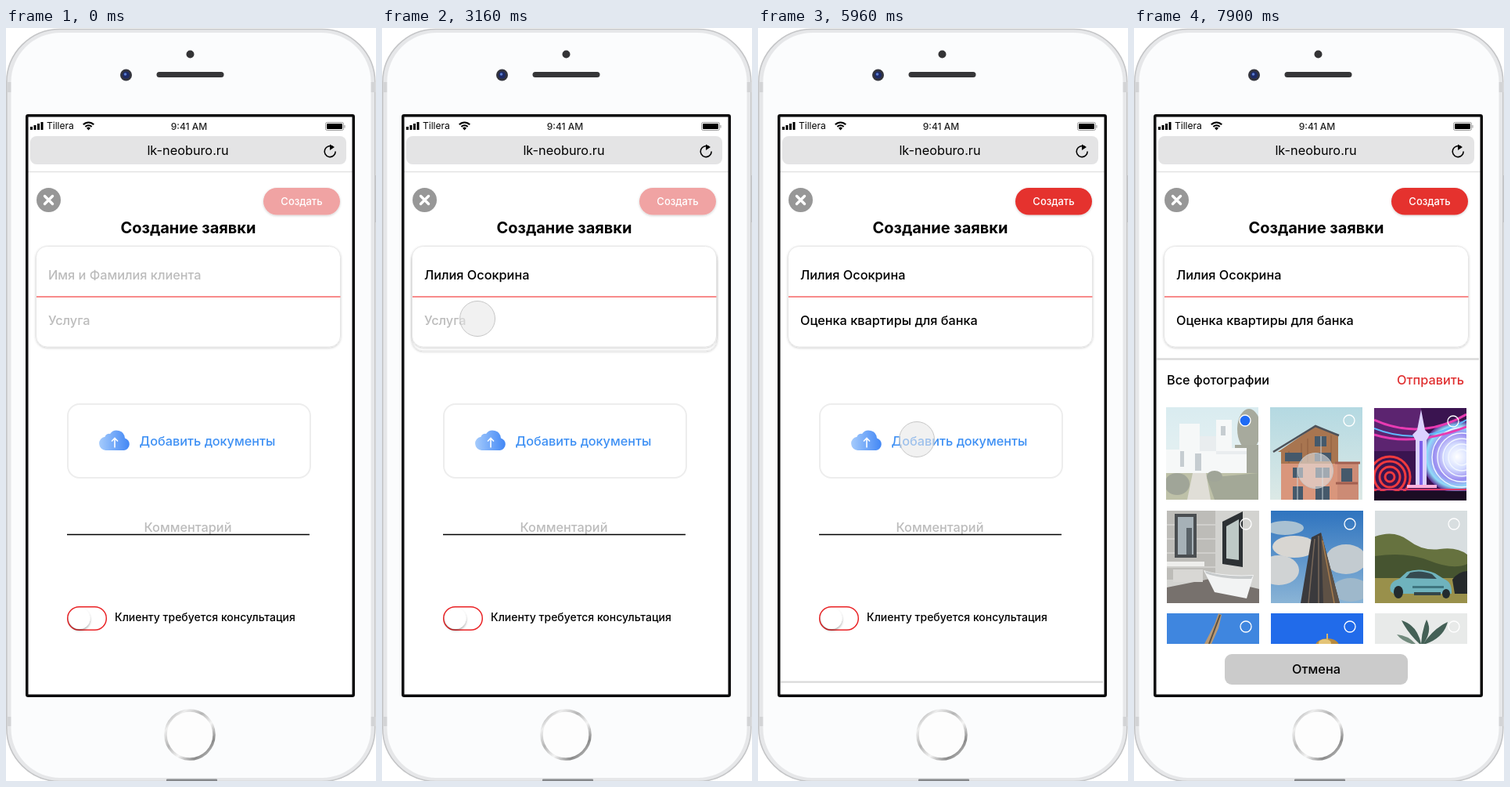
Write an HTML page that moves like this. It is 473x961 px and loops after 8 s.

```html
<!DOCTYPE html>
<html lang="ru">
<head>
<meta charset="utf-8">
<title>Создание заявки</title>
<style>
  html, body { margin: 0; width: 100%; height: 100%; overflow: hidden; background: #fff; }
  svg { display: block; }
  #stage { width: 100vw; height: 100vh; }
  text { font-family: Inter, "Open Sans", "Noto Sans", sans-serif; font-weight: 500; font-size: 16.3px; }
  .mid { text-anchor: middle; }
  .hint { fill: #bcbcbc; }
  .plain { font-weight: 400; }
  .tiny { font-size: 12px; }
  .small { font-size: 13.5px; }
</style>
</head>
<body>
<svg id="stage" viewBox="0 0 473 961" xmlns="http://www.w3.org/2000/svg">
  <defs>
    <clipPath id="screen"><rect x="28" y="113" width="415" height="738"/></clipPath>
    <filter id="soft" x="-10%" y="-20%" width="120%" height="150%">
      <feDropShadow dx="0" dy="1" stdDeviation="1.4" flood-opacity=".2"/>
    </filter>
    <filter id="knob" x="-30%" y="-30%" width="160%" height="170%">
      <feDropShadow dx="0" dy="2" stdDeviation="1.8" flood-opacity=".35"/>
    </filter>
    <linearGradient id="cloud"><stop stop-color="#a5cbfc"/><stop offset="1" stop-color="#4287f5"/></linearGradient>
    <linearGradient id="metal" x2="1" y2="1">
      <stop stop-color="#8d8d8d"/><stop offset=".2" stop-color="#eee"/><stop offset=".4" stop-color="#b5b5b5"/>
      <stop offset=".6" stop-color="#f4f4f4"/><stop offset=".8" stop-color="#8a8a8a"/><stop offset="1" stop-color="#ddd"/>
    </linearGradient>
    <linearGradient id="sky" x2="0" y2="1"><stop stop-color="#b4d9e2"/><stop offset="1" stop-color="#dce9e6"/></linearGradient>
    <linearGradient id="blue" x2="0" y2="1"><stop stop-color="#2f74bf"/><stop offset="1" stop-color="#8ab4d6"/></linearGradient>
    <radialGradient id="wheel">
      <stop stop-color="#fff"/><stop offset=".35" stop-color="#d5deff"/><stop offset=".65" stop-color="#9a8cf0"/>
      <stop offset=".85" stop-color="#8fdcf8"/><stop offset="1" stop-color="#5b2a90"/>
    </radialGradient>
  </defs>

  <!-- phone body -->
  <rect x="-1" y="188" width="4" height="50" fill="#c9cacc"/>
  <rect x="470" y="188" width="4" height="60" fill="#c9cacc"/>
  <rect x=".8" y="1.5" width="471" height="960" rx="68" fill="#e6e7e9" stroke="#c4c5c7" stroke-width="1.6"/>
  <path d="M1 69h6v13H1zM466 69h6v13h-6zM1 879h6v12H1zM466 879h6v12h-6z" fill="#d3d4d6"/>
  <rect x="6.5" y="6" width="460" height="951" rx="63" fill="#fbfcfd"/>
  <rect x="205" y="958.5" width="65" height="3" rx="1" fill="#85878a"/>
  <circle cx="235.5" cy="33.5" r="5" fill="#343436"/>
  <rect x="192.5" y="56" width="86" height="7" rx="3.5" fill="#363638"/>
  <circle cx="153.5" cy="60" r="7.5" fill="#33343d"/>
  <circle cx="153.5" cy="60" r="4.5" fill="#1d2a66"/>
  <circle cx="152.5" cy="59" r="1.8" fill="#5a7cd0"/>
  <circle cx="235" cy="902" r="31" fill="#fdfdfd" stroke="url(#metal)" stroke-width="3.5"/>

  <g clip-path="url(#screen)">
    <rect x="28" y="113" width="415" height="738" fill="#fff"/>

    <!-- browser bar -->
    <path d="M31 126h3v4h-3zM35.5 124h3v6h-3zM40 122h3v8h-3zM44.5 120h3v10h-3z"/>
    <text class="plain tiny" x="52" y="129">Tillera</text>
    <path d="M98.800 123.200a9.400 9.400 0 0 1 13.400 0M101.400 126a5.800 5.800 0 0 1 8.200 0" fill="none" stroke="#000" stroke-width="2"/>
    <path d="M103 127.800a3.600 3.600 0 0 1 5 0l-2.500 2.600z"/>
    <text class="mid tiny" x="234" y="129.5" fill="#222">9:41 AM</text>
    <rect x="408.5" y="120.5" width="23" height="10" rx="2" fill="none" stroke="#999"/>
    <rect x="410" y="122" width="20" height="7" rx="1"/>
    <path d="M433 124v3.5" stroke="#999"/>
    <rect x="31" y="138" width="404" height="36" rx="8" fill="#e4e4e5"/>
    <text class="mid plain" x="232.5" y="162">lk-neoburo.ru</text>
    <path d="M418 151.700a7 7 0 1 0 3.200 5.800" fill="none" stroke="#000" stroke-width="1.600"/>
    <path d="M414 148.500l6 3.500-6 4z"/>
    <path d="M28 183.500h415" stroke="#e3e3e3" stroke-width="1.5"/>

    <!-- form -->
    <circle cx="54.5" cy="219.5" r="15.5" fill="#979797"/>
    <path d="M49.500 214.500l10 10m0-10l-10 10" stroke="#fff" stroke-width="3.4" stroke-linecap="round"/>
    <rect id="create" x="329" y="204" width="98" height="34.5" rx="17.25" filter="url(#soft)"/>
    <text class="mid" x="378" y="225.5" style="font-size:13px" fill="#fff">Создать</text>
    <text class="mid" x="233" y="261.5" style="font-size:20px;font-weight:700">Создание заявки</text>

    <g id="drop">
      <rect x="38.5" y="326" width="389.5" height="129.5" rx="14" fill="#fff" stroke="#ececec" filter="url(#soft)"/>
      <text class="small" x="52" y="435">Оценка квартиры для банка</text>
    </g>
    <rect x="38.5" y="278.5" width="389" height="128.5" rx="14" fill="#fff" stroke="#e6e6e6" filter="url(#soft)"/>
    <path d="M39 343h388.500" stroke="#f88b8b" stroke-width="1.8"/>
    <text id="client" x="54" y="321"></text>
    <text id="service" x="54" y="379"></text>

    <rect x="79" y="480" width="310" height="94" rx="15" fill="#fff" stroke="#ededed" stroke-width="2"/>
    <path d="M127.500 539a8.700 8.700 0 0 1-1-17.300 5.500 5.500 0 0 1 6.500-3.800 10.500 10.500 0 0 1 19 5.500 8 8 0 0 1-1 15.600z" fill="url(#cloud)"/>
    <path d="M139 535.500v-12m-4 4l4-4 4 4" fill="none" stroke="#fff" stroke-width="1.6"/>
    <text class="mid" x="257.5" y="533" fill="#3e90f4">Добавить документы</text>

    <text class="mid hint" x="232.5" y="643">Комментарий</text>
    <path d="M78 646.500h310" stroke="#000" stroke-width="1.5"/>
    <rect x="78.7" y="738.7" width="49.6" height="29.6" rx="14.8" fill="#fff" stroke="#ea2225" stroke-width="1.5"/>
    <circle cx="94" cy="753.5" r="13.5" fill="#fff" filter="url(#knob)"/>
    <text style="font-size:14px" x="139" y="757">Клиенту требуется консультация</text>
    <path id="edge" d="M29 848.500h321" stroke="#d4d4d4" stroke-width="2"/>

    <!-- photo picker, drawn at its resting place -->
    <g id="sheet">
      <rect x="29" y="422" width="412" height="560" fill="#fff"/>
      <path d="M29 422.500h412" stroke="#dadada" stroke-width="2.4"/>
      <text x="42" y="454.500">Все фотографии</text>
      <text id="send" class="mid" x="379" y="454.500" fill="#e02f30">Отправить</text>
      <g id="photos"></g>
      <rect x="29" y="786" width="412" height="196" fill="#fff"/>
      <rect x="116" y="799" width="234" height="39" rx="9" fill="#cbcbcb"/>
      <text class="mid" x="233" y="823.500">Отмена</text>
    </g>
  </g>
  <rect x="26.75" y="111.75" width="417.5" height="740.5" rx="1.5" fill="none" stroke="#0b0b0c" stroke-width="3.5"/>

  <circle id="touch" r="22.5" fill="#e6e6e6" stroke="#c6c6c6"/>
</svg>

<script>
const LOOP = 8000;
const $ = id => document.getElementById(id);
const box = (x, y, w, h, fill) => `<rect x="${x}" y="${y}" width="${w}" height="${h}" fill="${fill}"/>`;
const shape = (d, fill) => `<path d="${d}" fill="${fill}"/>`;
const oval = (x, y, rx, ry, fill) => `<ellipse cx="${x}" cy="${y}" rx="${rx}" ry="${ry}" fill="${fill}"/>`;
const line = (d, color, w = 2) => `<path d="${d}" fill="none" stroke="${color}" stroke-width="${w}"/>`;
const rings = (x, y, radii, color, w) =>
  radii.map(r => `<circle cx="${x}" cy="${y}" r="${r}" fill="none" stroke="${color}" stroke-width="${w}"/>`).join('');
const backdrop = fill => box(0, 0, 118, 118, fill);

const photos = [
  // white villa
  backdrop('url(#sky)') + oval(106, 28, 15, 26, '#4f553a') + box(88, 48, 30, 36, '#4b5136') +
  shape('M0 54H17V21H43V37H64V16H84V52H103V86H0z', '#eef1f1') +
  shape('M43 37H64V56H43zM64 56H103V60H64z', '#d3dcdf') +
  shape('M37 59h8v22h-8zM70 24h6v12h-6zM18 56h5v20h-5z', '#8d9ba3') +
  box(0, 84, 118, 34, '#7c8450') + shape('M52 90L118 84V118H62z', '#46502e') +
  shape('M34 84H51L57 118H27z', '#c1bdb0') + oval(14, 98, 16, 14, '#414a30') + oval(62, 88, 10, 7, '#404a30'),
  // gabled house
  backdrop('url(#sky)') + shape('M10 57L58 24 87 36V74H14V57z', '#a87550') +
  box(14, 72, 72, 46, '#d9967c') + box(86, 70, 27, 48, '#cc8b75') +
  line('M4 57L58 24 88 36', '#4d525a', 2.5) + line('M24 56v15M40 46v25M48 40v30M78 36v35', '#8e5f3f', 1) +
  shape('M57 37h15v13H57zM19 58h22v11H19zM57 58h21v11H57zM29 77h13v13H29zM58 77h18v13H58zM29 101h13v17H29zM58 101h18v17H58zM91 78h14v17H91z', '#45596b') +
  line('M83 71h32M84 97h28', '#a15f50', 3) + line('M65 37v32M35 77v41M67 77v41', '#c8d3d8', 1),
  // fairground at night
  backdrop('#3a1450') + box(0, 0, 60, 55, '#5c2470') + oval(106, 62, 46, 46, 'url(#wheel)') +
  rings(112, 63, [10, 17, 24, 31, 38], '#f2f7ff', 1.4) +
  line('M0 15Q60 42 118 8M0 34Q50 50 118 24', '#e83bb2', 3) + line('M0 26Q60 50 118 15', '#5fb9ff', 2) +
  rings(20, 88, [6, 13, 20, 26], '#f03a3e', 3) +
  shape('M55 28L60 2 65 28 71 34 67 41V100H53V41L49 34z', '#dcd2ff') + line('M60 42v56', '#7d62ea', 4) +
  box(0, 106, 118, 12, '#1b0c24') + line('M0 104h118', '#d83a68', 2) + line('M42 100h38', '#ffb0dc', 4),
  // bathroom
  backdrop('#d3d3d0') + box(0, 0, 62, 88, '#bdbcb8') +
  [18, 36, 54, 72].map(y => line(`M0 ${y}h62`, '#d0cfcc', 2)).join('') +
  box(10, 4, 28, 56, '#4a4e51') + box(14, 8, 20, 48, '#a6b1b7') + box(25, 22, 7, 34, '#596268') +
  shape('M71 14L97 1V72L71 68z', '#2d3134') + shape('M76 20L92 11V63L76 61z', '#bec9c6') +
  shape('M0 98L60 86 118 100V118H0z', '#77716d') + box(0, 65, 48, 6, '#eeeeec') + box(8, 75, 38, 16, '#d8d7d4') +
  shape('M47 76Q70 84 111 82L102 112 61 104z', '#f2f3f3') + shape('M49 77Q70 85 110 83L108 87Q70 88 50 80z', '#c7cacb'),
  // skyscraper
  backdrop('url(#blue)') + oval(18, 22, 24, 9, '#a9c1d2') + oval(30, 46, 28, 14, '#d8d6d2') +
  oval(10, 76, 26, 19, '#d0d3d4') + oval(96, 62, 26, 19, '#c3cbd0') + oval(102, 101, 24, 15, '#9eb8cb') +
  shape('M38 118L52 34 64 28 88 118z', '#3b3a3d') + shape('M64 28L88 118H67z', '#5e5145') +
  line('M56 36L48 118M61 32L61 118', '#78685a', 1.5) + line('M66 38L81 118', '#a77c4d', 1.5),
  // car on a meadow
  backdrop('#d8dee0') + shape('M0 33Q25 24 43 38T83 49T118 56V96H0z', '#66723f') +
  shape('M0 58Q40 52 70 64T118 68V96H0z', '#465430') + box(0, 86, 118, 32, '#99904b') +
  shape('M99 88Q106 78 118 77V106H102z', '#25292b') +
  shape('M20 103Q17 91 31 87L41 78Q58 72 77 80L88 87Q99 91 98 106H24z', '#6fb3bd') +
  shape('M39 86L45 79Q58 75 73 81L79 87z', '#354a50') + box(48, 96, 40, 3, '#3f7680') +
  oval(30, 104, 6, 8, '#222b2e') + oval(91, 106, 5, 6, '#222b2e') + box(50, 104, 34, 4, '#34464a'),
  // spire
  backdrop('#3f86df') + shape('M48 39L61 14 66 0 70 2 66 19 57 39z', '#b89a77') + line('M68 2L54 39', '#5c503f', 2),
  // golden dome
  backdrop('#216bea') + oval(72, 41, 15, 9, '#b88a3c') + oval(69, 38, 8, 5, '#e4c477') + line('M72 34v-8', '#d7b466'),
  // leaves
  backdrop('#e8eae9') + shape('M57 39Q42 25 34 9Q54 15 59 39zM59 39Q60 22 66 8Q74 22 62 39zM62 39Q74 20 93 11Q88 31 65 39z', '#446056') +
  shape('M47 39Q34 35 28 27Q42 28 52 39z', '#718a7d')
];

$('photos').innerHTML = photos.map((art, i) => {
  const col = i % 3, row = Math.floor(i / 3);
  const x = 41 + col * 133 + (row ? 1 : 0);
  const y = [484, 616, 747][row] + (row === 0 && col === 2 ? 1 : 0);
  const first = i === 0;
  return `<svg x="${x}" y="${y}" width="118" height="118" overflow="hidden">${art}` +
    (first ? '<rect id="veil" width="118" height="118" fill="#fff" opacity=".5"/>' : '') +
    `<circle ${first ? 'id="check"' : ''} cx="101" cy="17" r="7" fill="none" stroke="#fff" stroke-width="1.3"/></svg>`;
}).join('');

const progress = (t, a, b) => Math.min(1, Math.max(0, (t - a) / (b - a)));
const smooth = p => p * p * (3 - 2 * p);
const easeOut = p => 1 - (1 - p) ** 2;

// cubic-bezier(.25, .1, .25, 1)
function ease(p) {
  if (p <= 0 || p >= 1) return p;
  const curve = (s, a, b) => 3 * (1 - s) ** 2 * s * a + 3 * (1 - s) * s * s * b + s ** 3;
  let lo = 0, hi = 1;
  for (let i = 0; i < 24; i++) {
    const mid = (lo + hi) / 2;
    if (curve(mid, .25, .25) < p) lo = mid; else hi = mid;
  }
  return curve(lo, .1, 1);
}

// start, end, x, y
const moves = [
  [520, 860, 152, 285], [1140, 1560, 129, 312], [2320, 2920, 122, 371], [3240, 3820, 114, 431],
  [4980, 5780, 203, 525], [6540, 6700, 98, 552], [7200, 7820, 232, 565]
];
const presses = [[1720, 2320], [3000, 3400], [4000, 4420], [5800, 6290], [7060, 7300], [7900, 8000]];

function touchAt(t) {
  let x = 371, y = 38;
  moves.forEach(([a, b, toX, toY], i) => {
    const p = (i ? smooth : easeOut)(progress(t, a, b));
    x += (toX - x) * p;
    y += (toY - y) * p;
  });
  return [x, y];
}

function set(id, attrs) {
  for (const key in attrs) $(id).setAttribute(key, attrs[key]);
}

function field(id, filled, value, hint) {
  $(id).textContent = filled ? value : hint;
  set(id, { class: filled ? '' : 'hint' });
}

function draw(t) {
  const chosen = t >= 4100, picked = t >= 7160;
  field('client', t >= 1860, 'Лилия Осокрина', 'Имя и Фамилия клиента');
  field('service', chosen, 'Оценка квартиры для банка', 'Услуга');
  set('create', { fill: chosen ? '#e5302f' : '#f0a3a3' });

  const open = ease(progress(t, 3120, 3520)) - ease(progress(t, 4100, 4420));
  set('drop', { transform: `translate(0 ${-48.5 * (1 - open)})`, visibility: open > 0 ? 'visible' : 'hidden' });
  set('edge', { visibility: chosen && t < 4420 ? 'visible' : 'hidden' });

  const rise = ease(progress(t, 5900, 6320));
  set('sheet', { transform: `translate(0 ${500 * (1 - rise)})` });

  const shown = picked ? 'visible' : 'hidden';
  set('send', { visibility: shown });
  set('veil', { visibility: shown });
  set('check', { fill: picked ? '#1f6bf5' : 'none' });

  const [x, y] = touchAt(t);
  const pressed = presses.some(([a, b]) => t >= a && t < b);
  set('touch', {
    cx: x, cy: y,
    'fill-opacity': pressed ? .57 : .06,
    visibility: t >= 520 ? 'visible' : 'hidden'
  });
}

const start = performance.now();
function tick(now) {
  draw(Math.max(0, now - start) % LOOP);
  requestAnimationFrame(tick);
}
draw(0);
requestAnimationFrame(tick);
</script>
</body>
</html>
```
